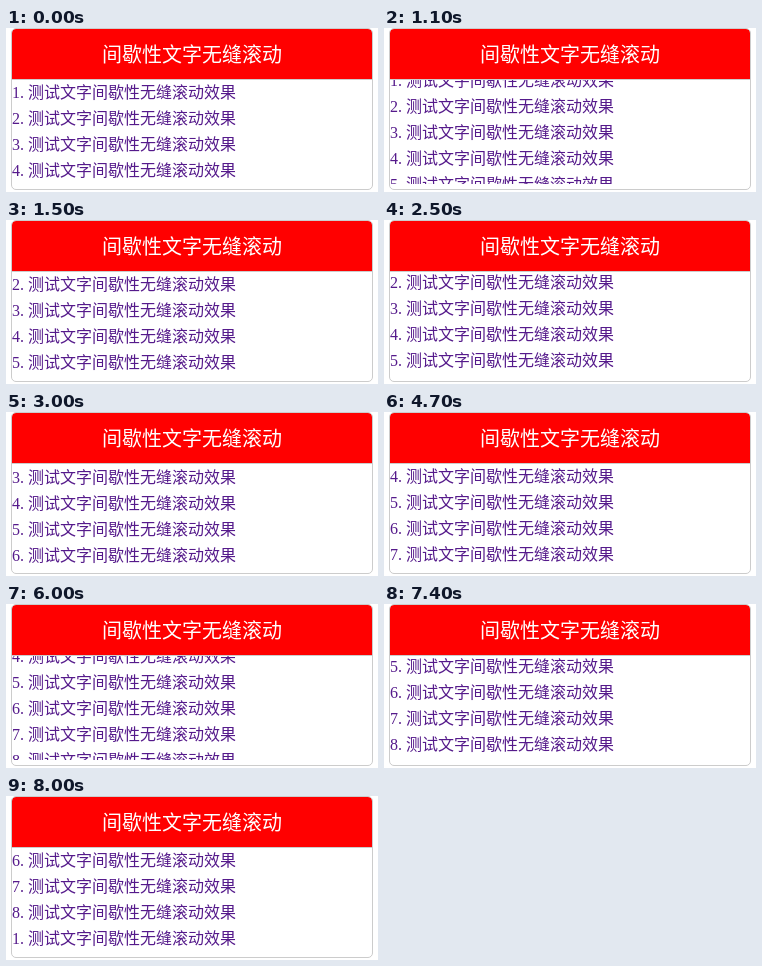
An HTML page for the animation above (8.9 s loop, 372x164 px).

```html
<!DOCTYPE html>
<html lang="zh-CN">
<head>
<meta charset="utf-8">
<style>
html, body { margin: 0; width: 100%; height: 100%; overflow: hidden; background: #fff; }
svg { display: block; }
text { font-family: "Noto Sans CJK SC", "Noto Sans CJK", sans-serif; font-weight: 300; }
.title { font-size: 20px; fill: #fff; text-anchor: middle; }
#list text { font-size: 16px; fill: #551a8b; }
#list .num { font-family: "Liberation Serif", serif; font-weight: 400; }
.line { fill: none; stroke: #ccc; }
</style>
</head>
<body>
<svg width="372" height="164">
  <clipPath id="view"><rect x="6" y="52" width="360" height="104"/></clipPath>
  <path d="M6 51V5Q6 1 10 1H362Q366 1 366 5V51Z" fill="#f00"/>
  <path class="line" d="M6 51.5H366"/>
  <rect class="line" x="5.5" y=".5" width="361" height="161" rx="4.5"/>
  <text class="title" x="186" y="34">间歇性文字无缝滚动</text>
  <g clip-path="url(#view)"><g id="list"></g></g>
</svg>
<script>
const LOOP = 8900, ROW = 26, ITEMS = 8;
const list = document.getElementById('list');

for (let i = 0; i < ITEMS + 2; i++) {
  const y = 70 + i * ROW;
  list.innerHTML += `<text class="num" x="6" y="${y}">${i % ITEMS + 1}.</text>
    <text x="22" y="${y}">测试文字间歇性无缝滚动效果</text>`;
}

// Each scroll: start time and pixels per 100 ms tick.
const scrolls = [[900, 4.6], [2500, 4.6], [4100, 3.9], [5800, 4.6], [7400, 4.6]];

function offset(t) {
  let sum = 0;
  for (const [start, speed] of scrolls) {
    if (t < start) break;
    const tick = Math.floor((t - start) / 100);
    sum += Math.min(ROW, Math.floor(2.9 + tick * speed));
  }
  return sum;
}

const t0 = performance.now();
function draw() {
  const t = (performance.now() - t0) % LOOP;
  list.setAttribute('transform', `translate(0 ${-offset(t)})`);
  requestAnimationFrame(draw);
}
draw();
</script>
</body>
</html>
```
